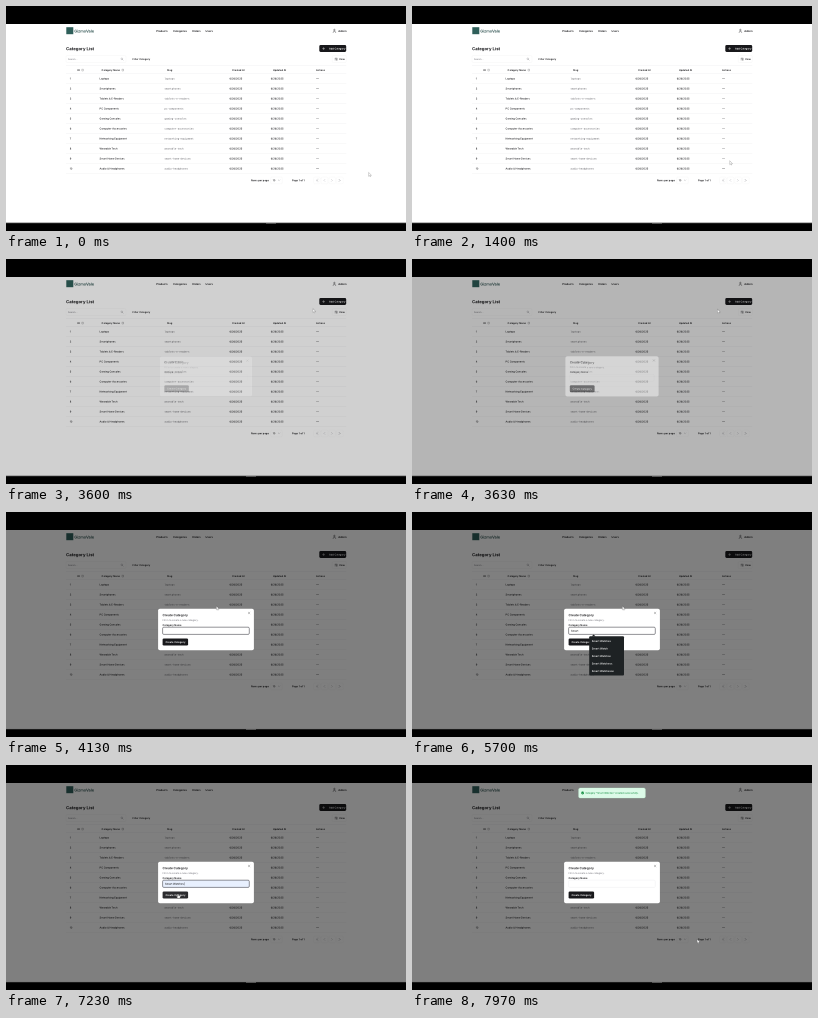
These frames come from a looping animation (400 px wide and 225 px high, 8 s). An HTML page:

```html
<!DOCTYPE html>
<html lang="en">
<head>
<meta charset="utf-8">
<title>Category list</title>
<style>
  html, body { margin: 0; width: 100%; height: 100%; overflow: hidden; background: #000; }
  svg { display: block; width: 100vw; height: 100vh; }
  text { font-family: Inter, "Open Sans", sans-serif; text-rendering: geometricPrecision; white-space: pre; }
  .mono { font-family: "Liberation Mono", "DejaVu Sans Mono", monospace; }
</style>
</head>
<body>
<svg id="stage" viewBox="0 0 400 225">
  <defs><clipPath id="view"><rect y="18" width="400" height="199"/></clipPath></defs>
</svg>
<script>
const LOOP = 8000;
const INK = '#18181b', GREY = '#74747c', LINE = '#ececee';
const stage = document.getElementById('stage');

function add(parent, tag, attrs, content) {
  const el = document.createElementNS('http://www.w3.org/2000/svg', tag);
  for (const key in attrs) el.setAttribute(key, attrs[key]);
  if (content !== undefined) el.textContent = content;
  parent.appendChild(el);
  return el;
}
const group = parent => add(parent, 'g', {});
const box = (parent, x, y, width, height, fill, rx = 0, more = {}) =>
  add(parent, 'rect', { x, y, width, height, fill, rx, ...more });
const outline = (parent, x, y, w, h, stroke = LINE) =>
  box(parent, x, y, w, h, '#fff', 1.2, { stroke, 'stroke-width': 0.3 });
const path = (parent, d, stroke = INK, width = 0.35, fill = 'none') =>
  add(parent, 'path', { d, stroke, fill, 'stroke-width': width, 'stroke-linecap': 'round', 'stroke-linejoin': 'round' });

// y is the vertical middle of the capitals; the invisible tilt keeps tiny glyphs off the pixel grid
function label(parent, str, x, y, size = 2.5, fill = INK, weight = 500, more = {}) {
  const base = y + size * 0.36;
  return add(parent, 'text', { x, y: base, 'font-size': size, 'font-weight': weight, fill,
    transform: `rotate(0.05 ${x} ${base})`, ...more }, str);
}
const show = (el, on) => el.setAttribute('display', on ? 'inline' : 'none');

// Page
const view = add(stage, 'g', { 'clip-path': 'url(#view)' });
const page = group(view);
box(page, 0, 18, 400, 199, '#fff');

box(page, 60.3, 21.2, 7, 7, '#2f5f5a');
label(page, 'GizmoVale', 68.2, 25, 3.9, '#2b4f4d', 600);
[['Products', 150.3], ['Categories', 167], ['Orders', 186], ['Users', 199.6], ['Admin', 332.3]]
  .forEach(([str, x]) => label(page, str, x, 25, 2.65, INK, 600));
add(page, 'circle', { cx: 328.4, cy: 24, r: 0.75, fill: 'none', stroke: INK, 'stroke-width': 0.4 });
path(page, 'M327.1 26.4 q0 -1.1 1.3 -1.1 t1.3 1.1', INK, 0.4);

label(page, 'Category List', 60, 42.7, 4.3, INK, 700);
box(page, 313.3, 39.1, 26.9, 6.8, INK, 1.3);
path(page, 'M316.6 42.6 h2 m-1 -1 v2', '#fff');
label(page, 'Add Category', 323, 42.6, 2.45, '#fff', 600);

outline(page, 60, 49.5, 60, 7);
label(page, 'Search...', 62, 53.1, 2.3, GREY, 400);
add(page, 'circle', { cx: 115.8, cy: 52.8, r: 0.8, fill: 'none', stroke: GREY, 'stroke-width': 0.3 });
path(page, 'M116.4 53.4 l.7 .7', GREY, 0.3);
label(page, 'Filter Category', 126.6, 53.1, 2.45, INK, 600);
outline(page, 326.3, 49.5, 14, 7);
path(page, 'M329 52.4 h2.4 M329 53.8 h2.4 M330 52 v.8 M330.7 53.4 v.8', INK, 0.3);
label(page, 'View', 332.9, 53.1, 2.45, INK, 600);

const hline = y => box(page, 60, y, 280.3, 0.35, LINE);
function sortIcon(x) {
  path(page, `M${x} 63.5 l.6 -.6 .6 .6 M${x} 64.6 l.6 .6 .6 -.6`, INK, 0.35);
}
hline(59);
hline(67.5);
[['ID', 71.6], ['Category Name', 95.6], ['Slug', 161], ['Created At', 226], ['Updated At', 267], ['Actions', 310]]
  .forEach(([str, x]) => label(page, str, x, 64.1, 2.45, INK, 600));
sortIcon(76);
sortIcon(116.2);

const categories = ['Laptops', 'Smartphones', 'Tablets & E-Readers', 'PC Components', 'Gaming Consoles',
  'Computer Accessories', 'Networking Equipment', 'Wearable Tech', 'Smart Home Devices', 'Audio & Headphones'];
categories.forEach((name, i) => {
  const y = 72.7 + i * 9.98;
  const slug = name.toLowerCase().replace(/[^a-z]+/g, '-');
  label(page, i + 1, 63.8, y);
  label(page, name, 93.6, y);
  label(page, slug, 158.5, y, 2.45, '#4a4a50', 400, { class: 'mono' });
  label(page, '6/26/2025', 223.5, y);
  label(page, '6/26/2025', 264.7, y);
  for (let k = 0; k < 3; k++) add(page, 'circle', { cx: 310.6 + k * 0.9, cy: y - 0.1, r: 0.3, fill: INK });
  hline(y + 4.9);
});

label(page, 'Rows per page', 245, 174.3, 2.5, INK, 600);
outline(page, 264.7, 171, 11.6, 6.8);
label(page, '10', 266.8, 174.3);
path(page, 'M272.4 174 l.7 .7 .7 -.7', GREY, 0.3);
label(page, 'Page 1 of 1', 286, 174.3, 2.5, INK, 600);
const left = 'm.5 -.9 l-.9 .9 .9 .9', right = 'm-.5 -.9 l.9 .9 -.9 .9';
[left + 'm1 -1.8 l-.9 .9 .9 .9', left, right, right + 'm.1 -1.8 l.9 .9 -.9 .9'].forEach((d, i) => {
  const x = 307.5 + i * 7.7;
  outline(page, x, 171, 6.6, 6.8, '#f0f0f1');
  path(page, `M${x + 3.1} 174.4 ${d}`, '#a0a0a5', 0.35);
});

// Dialog
const shade = box(view, 0, 18, 400, 199, '#000');
const dialog = group(view);
box(dialog, 152.1, 96.7, 95.8, 41.5, '#fff', 1.8);
label(dialog, 'Create Category', 156.5, 103.1, 3.2, INK, 600);
label(dialog, 'Fill in to create a new category.', 156.5, 108, 2.45, GREY, 400);
label(dialog, 'Category Name', 156.5, 113.1, 2.5, INK, 600);
path(dialog, 'M242.3 100.2 l1.6 1.6 m0 -1.6 l-1.6 1.6', '#555', 0.35);
const input = box(dialog, 156.6, 115.2, 86.7, 7.2, '#fff', 1.2);
const typed = label(dialog, '', 159, 118.9, 2.6);
const button = box(dialog, 156.6, 126.5, 25.5, 7.1, INK, 1.3);
label(dialog, 'Create Category', 159.5, 130.1, 2.5, '#fff', 600);

// Suggestion menus
function menu(items, width) {
  const g = group(view);
  path(g, 'M179.6 124.6 l2 -2 2 2 z', 'none', 0, '#1e2224');
  box(g, 177.2, 124.3, width, items.length * 7.5 + 1.6, '#1e2224', 1);
  const hover = box(g, 177.2, 125.2, width, 7.5, '#41474b');
  items.forEach((str, i) => label(g, str, 179.8, 129 + i * 7.5, 2.6, '#f2f2f2', 600));
  return { g, hover };
}
const wideMenu = menu(['Smart Watches', 'Smart Watch', 'Speakers & Sound Systems', 'Storage Devices & Memory',
  'Smart Watchess', 'Software'], 50);
const menuBox = menu(['Smart Watches', 'Smart Watch', 'Smart Watchse', 'Smart Watchess', 'Smart Watchesse'], 34.8);

// Toast
const toast = group(view);
box(toast, 166.6, 23, 66.8, 10, '#dcfae8', 1.6, { stroke: '#bdf3d2', 'stroke-width': 0.3 });
add(toast, 'circle', { cx: 170.6, cy: 28, r: 1.4, fill: '#0a8a3a' });
path(toast, 'M170 28 l.5 .5 .8 -1', '#dcfae8', 0.35);
label(toast, 'Category "Smart Watches" created successfully.', 173.4, 28, 2.28, '#0a8a3a', 500);

// Window edge and taskbar
box(stage, 0, 216.5, 400, 0.5, '#777');
box(stage, 0, 217, 400, 0.8, '#222');
const task = box(stage, 0, 217, 10, 0.8, '#666');

// Pointers, with the hot spot at 0,0
const pointer = group(view);
const arrow = path(pointer, 'M0 0 V3.5 L.85 2.8 1.4 4 2 3.7 1.45 2.55 2.5 2.5 Z', '#555', 0.25, '#fff');
const hand = path(pointer, 'M-.4 .3 q.4 -.6 .8 0 V1.7 L1.9 2 q.4 .1 .4 .6 L1.9 4.3 H-.3 L-1.4 2.7 q0 -.6 .6 -.4 L-.4 2.6 Z', '#444', 0.25, '#fff');

const moves = [
  [0, 362.6, 166.8], [850, 322, 168], [1700, 316, 150], [2450, 306, 124], [2850, 300, 108], [2930, 300, 108],
  [3320, 326, 43], [3450, 326, 43], [3630, 305.5, 50.5], [4110, 210.4, 94.3], [6220, 210.4, 94.3],
  [6680, 194, 128.5], [6900, 194, 128.5], [7200, 172, 128.9], [7310, 172, 128.9],
  [7670, 271, 160], [7950, 285.2, 174.4], [8000, 285.2, 174.4]
];
const typing = [[0, ''], [4330, 'S'], [4800, 'Sm'], [4970, 'Sma'], [5130, 'Smar'], [5700, 'Smart'],
  [6680, 'Smart Watches'], [6870, 'Smart Watches|'], [7600, '']];

const clamp = v => Math.min(1, Math.max(0, v));
const easeOut = v => 1 - (1 - v) ** 2;
const progress = (t, start, length) => easeOut(clamp((t - start) / length));
const between = (t, a, b) => t >= a && t < b;

function position(t) {
  const i = moves.findIndex(m => m[0] > t);
  const [t0, x0, y0] = moves[i - 1], [t1, x1, y1] = moves[i];
  const u = (t - t0) / (t1 - t0), k = u * u * (3 - 2 * u);
  return [x0 + (x1 - x0) * k, y0 + (y1 - y0) * k];
}

function render(t) {
  const open = progress(t, 3580, 200);
  const scale = 0.95 + 0.05 * open;
  shade.setAttribute('opacity', 0.5 * progress(t, 3560, 200));
  dialog.setAttribute('opacity', open);
  dialog.setAttribute('transform', `translate(200 117.4) scale(${scale}) translate(-200 -117.4)`);

  const focused = between(t, 3700, 7600);
  input.setAttribute('fill', between(t, 6680, 7600) ? '#e8f0fe' : '#fff');
  input.setAttribute('stroke', focused ? '#3a3a40' : '#e4e4e7');
  input.setAttribute('stroke-width', focused ? 0.55 : 0.3);
  typed.textContent = typing.filter(step => step[0] <= t).pop()[1];

  show(wideMenu.g, between(t, 4350, 4800));
  show(wideMenu.hover, false);
  show(menuBox.g, between(t, 4800, 6870));
  show(menuBox.hover, t >= 6650);

  const slide = progress(t, 7580, 380);
  toast.setAttribute('opacity', slide);
  toast.setAttribute('transform', `translate(0 ${-14 * (1 - slide)})`);
  task.setAttribute('x', t < 400 ? 260 : 240);

  const [x, y] = position(t);
  const overButton = between(t, 7120, 7360);
  const pointing = overButton || between(t, 3270, 3600);
  button.setAttribute('fill', overButton ? '#2b2b2e' : INK);
  pointer.setAttribute('transform', `translate(${x} ${y})`);
  show(arrow, !pointing);
  show(hand, pointing);
}

const start = performance.now();
function tick() {
  render((performance.now() - start) % LOOP);
  requestAnimationFrame(tick);
}
tick();
</script>
</body>
</html>
```
